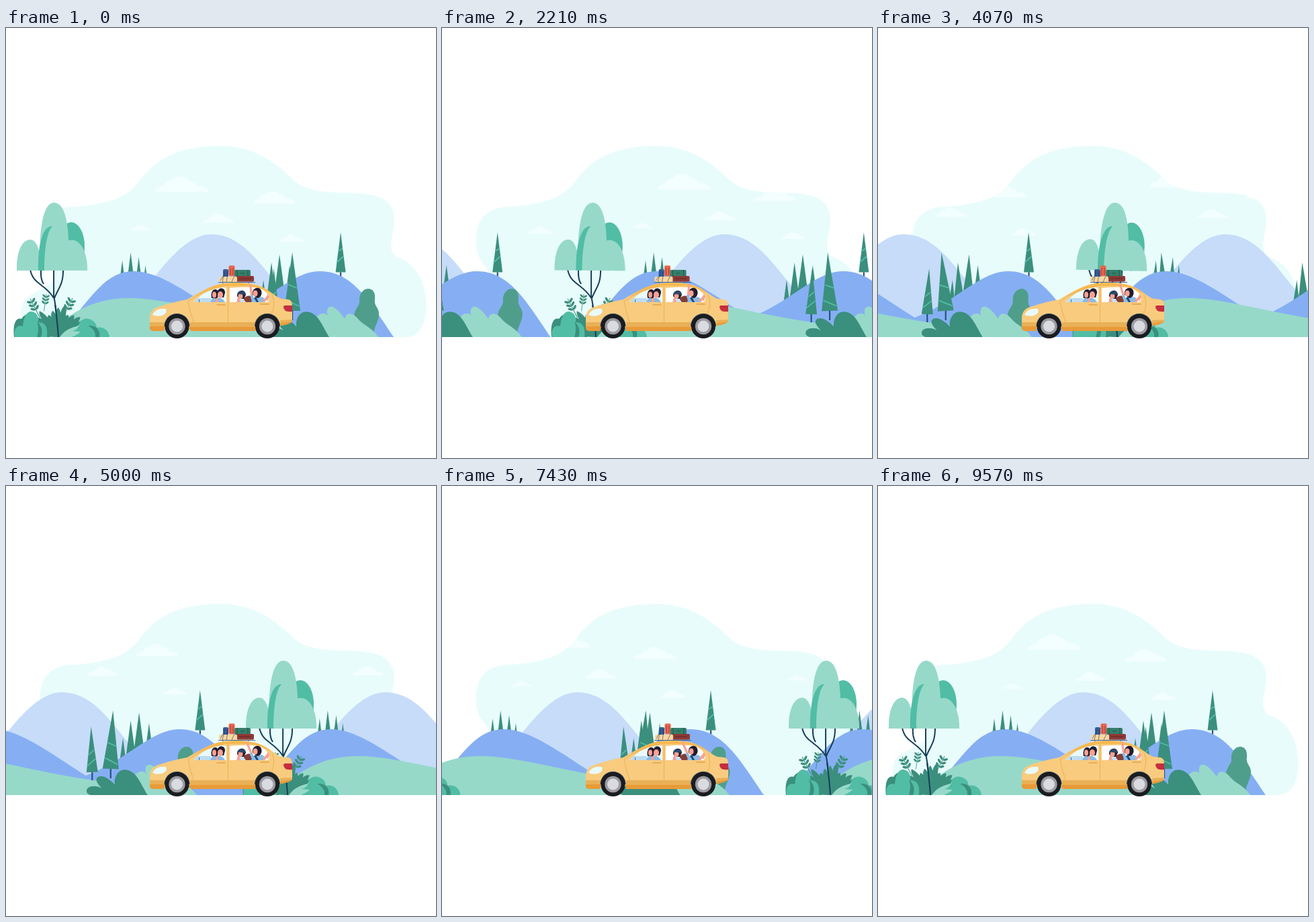
An HTML page that plays this animation: 640 px wide and 640 px high, repeating every 9640 ms.

```html
<!DOCTYPE html>
<html lang="en">
<head>
<meta charset="utf-8">
<title>Family road trip</title>
<style>
html, body { margin: 0; width: 100%; height: 100%; overflow: hidden; background: #fff }
svg { display: block; width: 100vw; height: 100vh }
.pale { fill: #97d9c9 }
.teal { fill: #51bda5 }
.dark { fill: #3b8f7d }
.navy { fill: none; stroke: #163f58; stroke-width: 2 }
.seam { fill: none; stroke: #e9ae55; stroke-width: .9 }
.skin { fill: #f8a293 }
.hair { fill: #211b2d }
</style>
</head>
<body>
<svg viewBox="0 0 640 640">
  <defs>
    <g id="clouds" fill="#fff" fill-opacity=".42"></g>
    <path id="mountain" fill="#c6dcf9" d="M150 460C198 412 250 307 305 307C358 307 386 366 422 402Q446 428 460 460Z"/>
    <g id="hills">
      <g id="hillTrees" class="dark"></g>
      <path fill="#86aff3" d="M78 460C130 395 150 362 190 362C230 362 275 398 328 431C390 408 425 362 467 362C515 362 540 405 577 460Z"/>
    </g>
    <g id="front">
      <path class="pale" d="M60 460C90 425 130 402 183 402C250 402 340 436 470 446L500 460Z"/>
      <g id="bigTrees" class="dark"></g>
      <path fill="#4f9e8b" d="M547 455C549 441 555 437 555 425C555 416 547 414 549 403C550 393 545 388 539 388C530 388 525 398 526 407C527 413 518 418 518 430C518 440 522 446 530 450Z"/>
      <path class="pale" d="M458 460C456 436 463 424 473 425Q477 425 479 429C475 417 481 412 488 416C495 420 501 428 504 433C507 422 516 424 523 432C532 443 544 445 554 460Z"/>
      <path class="dark" d="M396 460C386 457 390 447 399 447Q406 446 413 450C406 443 402 437 407 433C415 429 425 437 432 444C431 433 437 421 449 422.500C464 424 470 442 481 460Z"/>
      <g class="navy">
        <path d="M78 460Q76 425 71 398V360M71 402C58 380 41 383 36 360M56 381Q51 374 52 360M72 402C78 386 85 383 85 360"/>
      </g>
      <g id="crown">
        <ellipse class="teal" cx="97" cy="325" rx="20" ry="36"/>
        <path class="pale" d="M16 361C15 335 23 315 36 315C45 315 51 329 54 361Z"/>
        <path class="pale" d="M52 361C48 310 53 260 71.500 260C87 260 92 288 93 316C112 311 122 338 121 361Z"/>
        <path class="teal" d="M48 361C47 325 54 294 69 295C60 304 57 332 57 361Z"/>
      </g>
      <g id="fronds" class="dark"></g>
      <path class="navy" d="M78 460Q76 434 73 412"/>
      <path class="dark" d="M12 460C10 442 14 430 23 433C30 421 43 425 46 439C57 431 67 443 65 460Z"/>
      <path class="teal" d="M13 460C10 447 18 441 25 444C26 426 34 419 41 423C47 425 49 432 48 438C61 438 62 449 61 460Z"/>
      <path class="dark" d="M46 437Q57 447 52 460H46Q50 448 46 437Z"/>
      <path class="teal" d="M99 460C97 450 103 444 109 446C106 436 116 431 123 433C131 435 134 439 135 446C145 444 153 450 154 460Z"/>
      <path class="dark" d="M122 443C134 442 141 449 139 460H133Q134 449 122 443Z"/>
      <path class="pale" d="M80 460C89 447 99 446 110 442Q106 449 99 451L111 452Q104 459 94 460Z"/>
    </g>
  </defs>

  <path fill="#e9fcfc" d="M40 460C23 449 16 419 28 405C40 390 70 388 72 369C72 356 51 351 50.500 318C50 282 69 266 101 266C140 263 176 257 197 230C217 202 245 176 318 175.500C374 175 407 206 430 228C473 265 579 218 578 288C578 305 566 328 580 340C605 348 624 370 626 412C626 446 610 460 598 460Z"/>
  <g id="scene"></g>

  <g id="car">
    <g id="luggage">
      <rect x="323" y="359" width="8" height="12" rx="2" fill="#345f9f"/>
      <path d="M325 362v8M329 362v8" stroke="#243f73"/>
      <rect x="331.500" y="353.500" width="9" height="16" rx="2" fill="#e7674d"/>
      <path d="M334 357v11M338 357v11" stroke="#a83f3b"/>
      <rect x="340" y="360" width="24" height="10" rx="2" fill="#347f6b"/>
      <path d="M344 360v10M360 360v10M349 365h6" stroke="#205548"/>
      <rect x="343" y="369" width="26" height="8.500" rx="2" fill="#8d3934"/>
      <path d="M347 373h18" stroke="#5c2527"/>
      <rect x="317" y="370" width="27" height="8" rx="2" fill="#f9d7a0"/>
      <path d="M322 378l4-18M328 378l3-18M336 378l4-9M319 376l4-7" stroke="#405269" stroke-width=".7" fill="none"/>
    </g>
    <path d="M316 378.500H371M323 378v4M361 378v4" stroke="#40628c"/>
    <path fill="#f8cb7e" d="M214 446V429Q216 419 224 416Q247 408 270 404C291 391 310 382 325 380Q356 377 375 383C392 389 399 399 410 403L420 404Q426 405 426 413V436Q423 441 409 443L405 447H371V451H274V446Z"/>
    <path fill="#f9b94e" d="M276 401C296 389 312 380 329 380Q358 378 376 384Q390 389 397 397Q381 386 362 384H327Q300 389 276 401Z"/>
    <path fill="#e9b056" d="M214 438H237V446H214ZM274 438H371V446H274ZM408 435L426 434V437Q422 441 408 443Z"/>
    <path fill="#e99a38" d="M214 444H237L235 451H218Q213 450 214 444ZM273 445H371V451H276Q272 449 273 445ZM409 440L425 437Q423 441 409 443Z"/>
    <path fill="#e9fafc" d="M279 408Q294 392 313 387Q324 385 328 387V408Z"/>
    <path fill="#fff" d="M333 387Q364 384 379 388Q389 392 392 403L390 408H333Z"/>

    <g id="people">
      <path fill="#bddcf1" d="M280 408L285 402H304L309 408Z"/>
      <path fill="#536a8a" d="M287 404h1v4h-1z"/>
      <path class="hair" d="M306 402C303 388 315 385 316 394L315 403Z"/>
      <ellipse class="skin" cx="310" cy="397" rx="3" ry="4.500"/>
      <path class="hair" d="M315 394C314 386 326 385 326 394L324 401H319Z"/>
      <ellipse class="skin" cx="319" cy="397" rx="4" ry="5"/>
      <path fill="#88b9e5" d="M304 408Q307 400 313 403Q320 399 326 408Z"/>
      <path class="skin" d="M312 403l3-2 1 7h-4z"/>
      <path fill="#843e36" d="M354 408V402Q359 397 365 399L367 408Z"/>
      <path class="hair" d="M344 399C344 389 356 388 357 397L354 403H347Z"/>
      <ellipse class="skin" cx="349" cy="399" rx="3.500" ry="4"/>
      <path fill="#294969" d="M344 396Q347 389 355 393L357 397Z"/>
      <path fill="#c5e2f4" d="M342 408Q346 401 354 404L357 408Z"/>
      <path class="skin" d="M344 403l3-2 2 7h-5z"/>
      <path fill="#8abce8" d="M365 408Q368 398 376 401Q383 398 387 406L385 408Z"/>
      <path class="hair" d="M367 397C365 387 377 383 380 391C382 397 378 402 374 402Z"/>
      <ellipse class="skin" cx="371" cy="395" rx="3.500" ry="4.500"/>
      <path fill="#24486c" d="M372 400l4 8h-3l-4-6z"/>
      <path d="M384 406L388 402" stroke="#f8a293" stroke-width="3.500" stroke-linecap="round"/>
      <path fill="#f8a293" d="M386 402l4-6 2 5-3 6z"/>
    </g>

    <path class="seam" d="M271 407Q274 424 280 440H371M330.500 384V440M271 407Q294 390 323 385M396 397Q402 411 395 426"/>
    <path d="M314 412h12M379 411h12" stroke="#e3a147" stroke-width="1.600" stroke-linecap="round"/>
    <path fill="#e9fafc" d="M218 427Q223 416 238 418Q241 425 232 428Q224 430 218 427Z"/>
    <path fill="#c72c3f" d="M426 413H415Q411 414 415 420Q418 423 426 422Z"/>
    <g id="arm" stroke-linecap="round" fill="none">
      <path id="forearm" stroke="#f8a293" stroke-width="3.200"/>
      <path id="sleeve" stroke="#8abce8" stroke-width="4"/>
    </g>
    <g id="wheels"></g>
  </g>
</svg>
<script>
// The scene moves for MOVE ms, then rests on its first pose until the loop ends.
const LOOP = 9640, MOVE = 9570;
const $ = id => document.getElementById(id);

function add(parent, tag, attrs) {
  const el = document.createElementNS('http://www.w3.org/2000/svg', tag);
  for (const key in attrs) el.setAttribute(key, attrs[key]);
  parent.appendChild(el);
  return el;
}

// Clouds: left, base, width.
for (const [x, y, w] of [[222, 244, 80], [367, 261, 63], [294, 290, 46], [185, 302, 30], [407, 318, 36]])
  add($('clouds'), 'path', {
    d: 'M0 0Q.03-.36 .17-.4Q.2-.74 .3-.72C.35-1.09 .58-1.09 .63-.72Q.76-.72 .78-.42Q.96-.44 1 0Z',
    transform: `translate(${x} ${y}) scale(${w} ${w * .29})`
  });

const conifers = [];

function conifer(parent, x, top, base, half, lean, wave, trunk = 0, stripes = '') {
  const g = add(parent, 'g', {});
  if (trunk) add(parent, 'path', { d: `M${x} ${base}v${trunk}`, stroke: '#24527c', 'stroke-width': 2.2 });
  add(g, 'path', { d: `M${x} ${top}L${x + half} ${base}H${x - half}Z` });
  if (stripes) add(g, 'path', { d: stripes, stroke: '#51bda5', 'stroke-width': 1.8 });
  conifers.push({ g, x, base, wave, angle: Math.atan(lean / (base - top)) * 180 / Math.PI });
}

const swing = p => Math.sin(2 * Math.PI * p);
const nod = p => (1 - Math.cos(2 * Math.PI * p)) / 2;

for (const [x, top, lean] of [[173, 346, 2.5], [185.5, 334, -4.5], [197.5, 341, 3.5], [207.5, 353, 2]])
  conifer($('hillTrees'), x, top, 395, (395 - top) * .125, lean, nod);
for (const [x, top, lean] of [[383, 375, 2], [395, 349, -4], [407, 337, 3], [422, 353, 0]])
  conifer($('hillTrees'), x, top, 430, (430 - top) * .135, lean, nod);
conifer($('hillTrees'), 498, 304, 363.5, 7.5, -.7, nod, 9, 'M495 332l6-4M492 349l10-9');
conifer($('bigTrees'), 398.5, 358, 426, 8.5, -3, swing, 12, 'M394 400l8-7M391 417l13-11');
conifer($('bigTrees'), 426, 334, 421, 12, 6.5, swing, 14, 'M420 382l13 5M417 405l19 9');

// Fan of fronds around the trunk.
for (let i = 0; i < 13; i++) {
  const angle = -72 + i * 12, len = 36 + 12 * ((i * 5) % 4) / 3;
  add($('fronds'), 'path', {
    d: `M78 460C73 ${460 - len * .5} 71 ${460 - len * .9} 78 ${460 - len}C84 ${460 - len * .8} 83 ${460 - len * .5} 78 460`,
    transform: `rotate(${angle} 78 460)`
  });
}
// Leafy sprigs: tip, lean, scale.
for (const [x, y, angle, scale] of [[36, 403, -27, 1], [60, 396, 8, .8], [99, 402, 27, 1]]) {
  const g = add($('fronds'), 'g', { transform: `translate(${x} ${y}) rotate(${angle}) scale(${scale})` });
  add(g, 'path', { d: 'M0 0V32', stroke: '#3b8f7d', 'stroke-width': 1 });
  for (let i = 0; i < 6; i++) {
    const side = i % 2 ? 1 : -1, ly = 4 + (i >> 1) * 6;
    add(g, 'ellipse', { cx: side * 3.5, cy: ly, rx: 3.8, ry: 1.8, transform: `rotate(${-side * 38} ${side * 3.5} ${ly})` });
  }
}

for (const x of [254.5, 389]) {
  add($('wheels'), 'path', { d: `M${x - 19} 444a19 19 0 0 1 38 0`, fill: '#1d3b57' });
  for (const [r, fill] of [[18, '#1b1c20'], [12.2, '#9b9ba1'], [8.5, '#dadae1']])
    add($('wheels'), 'circle', { cx: x, cy: 444, r, fill });
}

// Two copies per layer; positions at the start, middle and end of the move.
const layers = [
  ['clouds', [0, 212, 424], [-363, -181.5, 0], [0, -8, -16], [-16, -8, 0]],
  ['mountain', [0, 248, 496], [-465, -232.5, 0]],
  ['hills', [0, 281, 562], [-584, -219, 0]],
  ['front', [0, 327, 640], [-566, -283, 0]]
].flatMap(([id, a, b, ay = [0, 0, 0], by = ay]) =>
  [[b, by], [a, ay]].map(([x, y]) => ({ el: add($('scene'), 'use', { href: '#' + id }), x, y })));

const along = ([a, b, c], u) => u < .5 ? a + (b - a) * u * 2 : b + (c - b) * (u * 2 - 1);

function draw(now) {
  const t = now % LOOP, u = t < MOVE ? t / MOVE : 0, p = u * 4;
  // The copy that ends in the resting pose takes over for the hold.
  for (const { el, x, y } of layers) el.setAttribute('transform', `translate(${along(x, u)} ${along(y, u)})`);
  for (const c of conifers) c.g.setAttribute('transform', `rotate(${c.angle * c.wave(p)} ${c.x} ${c.base})`);
  $('crown').setAttribute('transform', `rotate(${1.3 * Math.max(0, -swing(p))} 71 400)`);
  $('luggage').setAttribute('transform', `translate(${Math.min(0, swing(p))} 0)`);
  const hand = 363.5 - 5.5 * swing(p * 2);
  $('forearm').setAttribute('d', `M366 400L${hand} 382`);
  $('sleeve').setAttribute('d', `M368 406L${366 + (hand - 366) * .15} 399`);
  requestAnimationFrame(() => draw(performance.now() - start));
}
const start = performance.now();
draw(0);
</script>
</body>
</html>
```
